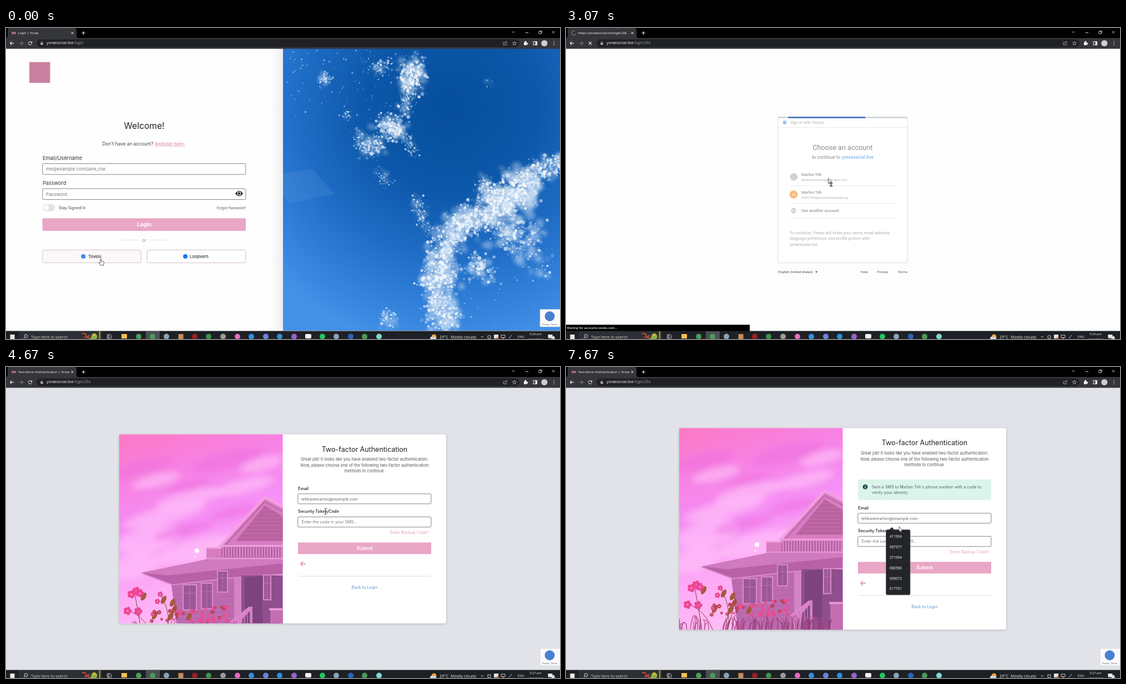
Write an HTML page with a canvas that moves like this. It is 998 px wide and 561 px high and loops after 8 s.

```html
<!DOCTYPE html>
<html lang="en">
<head>
<meta charset="utf-8">
<title>Sign-in walkthrough</title>
<style>
html, body { margin: 0; width: 100%; height: 100%; overflow: hidden; background: #fff }
canvas, svg, #url { position: absolute }
canvas { left: 499px; top: 37px }
svg { left: 0; top: 0 }
#url { left: 73px; top: 20px; width: 816px; font: 6.85px/14px "Open Sans", sans-serif; color: #9aa0a6;
  white-space: nowrap; overflow: hidden; text-overflow: ellipsis }
#url b { font-weight: 400; color: #fff }
</style>
</head>
<body>
<canvas id="sky" width="499" height="509"></canvas>
<svg width="998" height="561"></svg>
<div id="url"><b id="host"></b><span id="path"></span></div>
<script>
const $ = id => document.getElementById(id);
let seed = 11;
const rnd = () => (seed = seed * 16807 % 2147483647) / 2147483647;
const list = (n, f) => Array.from({ length: n }, (_, i) => f(i)).join('');

// ---- markup helpers; y of a text is its visual middle
const FONTS = { i: 'Inter', o: 'Open Sans', r: 'Roboto' };
const text = (x, y, s, size, fill, font = 'i', more = '') =>
  `<text x="${x}" y="${y + size * .36}" font-size="${size}" fill="${fill}" font-family="${FONTS[font]}, sans-serif" ${more}>${s}</text>`;
const MID = 'text-anchor="middle"', END = 'text-anchor="end"', SEMI = 'font-weight="500"', BOLD = 'font-weight="600"';
const rect = (x, y, w, h, fill, more = '') => `<rect x="${x}" y="${y}" width="${w}" height="${h}" fill="${fill}" ${more}/>`;
const dot = (x, y, r, fill, more = '') => `<circle cx="${x}" cy="${y}" r="${r}" fill="${fill}" ${more}/>`;
const line = (d, stroke, w = 1, more = '') => `<path d="${d}" fill="none" stroke="${stroke}" stroke-width="${w}" ${more}/>`;
const shape = (d, fill, more = '') => `<path d="${d}" fill="${fill}" ${more}/>`;
const group = (id, s, more = '') => `<g id="${id}" ${more}>${s}</g>`;
const input = (x, y, w, h) => rect(x, y, w, h, '#fff', 'rx="2" stroke="#66666a" stroke-width=".8"');

// ---- photo of clouds
function paintSky() {
  const c = $('sky').getContext('2d');
  c.translate(-499, -37);
  const g = c.createRadialGradient(800, 140, 30, 800, 140, 440);
  [[0, '#07509f'], [.3, '#0c57a9'], [.6, '#1f6dc6'], [.85, '#3483dc'], [1, '#4491e8']].forEach(s => g.addColorStop(...s));
  c.fillStyle = g;
  c.fillRect(499, 37, 499, 509);
  c.fillStyle = '#6a9fe030';
  c.beginPath();
  [[499, 262], [552, 254], [592, 300], [510, 316], [499, 300]].forEach(p => c.lineTo(...p));
  c.fill();
  const puffs = [
    [738, 65, 728, 105, 20, 170], [728, 105, 716, 150, 13, 80], [680, 175, 708, 185, 20, 130],
    [645, 220, 668, 205, 15, 90], [632, 185, 640, 215, 9, 30], [715, 190, 738, 228, 9, 40],
    [573, 92, 575, 92, 10, 45], [612, 152, 616, 164, 7, 22], [655, 70, 690, 68, 13, 35],
    [670, 260, 690, 285, 11, 22], [868, 97, 869, 98, 6, 10], [738, 302, 750, 350, 10, 65],
    [750, 350, 780, 385, 10, 40], [1000, 240, 930, 275, 17, 200], [940, 280, 880, 325, 31, 380],
    [885, 325, 805, 360, 24, 300], [815, 355, 775, 430, 24, 230], [755, 455, 805, 440, 21, 180],
    [775, 470, 790, 540, 26, 230], [860, 280, 866, 296, 14, 70], [890, 370, 950, 375, 25, 120],
    [840, 420, 870, 445, 20, 60], [915, 400, 985, 430, 25, 35], [686, 518, 690, 532, 13, 60]];
  const scatter = (count, size, color) => {
    for (const [x0, y0, x1, y1, spread, n] of puffs)
      for (let i = 0; i < n * count; i++) {
        const u = rnd(), off = () => (rnd() + rnd() + rnd() - 1.5) * spread * 1.15;
        c.fillStyle = color();
        c.beginPath();
        c.arc(x0 + (x1 - x0) * u + off(), y0 + (y1 - y0) * u + off(), size(spread), 0, 7);
        c.fill();
      }
  };
  c.filter = 'blur(3px)'; // soft body, then fine grain
  scatter(.35, s => s * (.12 + .22 * rnd()), () => '#d5e6f766');
  c.filter = 'blur(.6px)';
  scatter(2.4, s => .5 + rnd() ** 3 * Math.min(3, s * .16), () => rnd() < .3 ? '#8fb9e770' : `rgba(250,252,255,${.25 + .55 * rnd()})`);
  for (let i = 0; i < 150; i++) { // loose droplets
    c.fillStyle = `rgba(200,225,250,${.25 + .45 * rnd()})`;
    c.beginPath();
    const low = i > 90;
    c.arc((low ? 780 : 505) + rnd() * 200, (low ? 350 : 40) + rnd() ** 1.5 * (low ? 190 : 120), .5 + rnd() * 1.2, 0, 7);
    c.fill();
  }
}

// ---- browser frame and taskbar
const CROSS = 'M-2-2L2 2M2-2L-2 2';
const at = (x, y, s, id = '') => `<g ${id && `id="${id}"`} transform="translate(${x} ${y})">${s}</g>`;
const chrome = () =>
  rect(0, 0, 998, 19, '#000') + shape('M0 18Q3 18 3 14V3Q3 0 6 0H123Q127 0 127 4V14Q127 18 130 18Z', '#35363a') +
  rect(0, 18, 998, 19.5, '#35363a') + rect(55, 20.5, 870, 14, '#202124', 'rx="7"') +
  group('iconPink', rect(10, 7, 8, 4, '#9c6b80')) + group('iconBlue', dot(14, 9, 3.6, '#4285f4')) +
  at(14, 9, group('spin', line('M3.8 0A3.8 3.8 0 1 1 0-3.8', '#8a8d92', 1.1)) + dot(0, 0, 2.4, '#c8cacd', 'id="globe"')) +
  text(22, 9, '', 5.85, '#fff', 'o', 'id="tab"') + at(119.5, 9, line(CROSS, '#fff', .9)) +
  line('M139.5 6V12M136.5 9H142.5', '#fff') + line('M911.5 6L914 8.5L916.5 6M935.5 8.5H941', '#ddd', .9) +
  line('M960 6.5H964V10.5H960ZM961.5 6V5H965.5V9H964.5', '#ddd', .8) + at(986, 7.5, line(CROSS, '#ddd', .9)) +
  line('M14.5 27.5H7.5M10.5 24.5L7.5 27.5L10.5 30.5', '#eee', 1.1) + line('M23.5 27.5H30.5M27.5 24.5L30.5 27.5L27.5 30.5', '#777a7e', 1.1) +
  at(43.5, 27.5, group('reload', line('M2.8-1A3 3 0 1 0 2.8 1M3.2-3.4V-.8H.6', '#eee', 1)) + group('stop', line('M-2.6-2.6L2.6 2.6M2.6-2.6L-2.6 2.6', '#eee', 1.1))) +
  rect(62.3, 26.5, 4.4, 3.8, '#aeb1b5') + line('M63.2 26.5V25.3Q64.5 23 65.8 25.3V26.5', '#aeb1b5', .8) +
  line('M898 26H896V30.5H902V28.5M898 28.5Q898.5 25.5 902 25.5M900.5 23.5L902.5 25.5L900.5 27.5', '#bbb', .8) +
  line('M916 24L917 26.4L919.6 26.6L917.6 28.3L918.3 30.8L916 29.4L913.7 30.8L914.4 28.3L912.4 26.6L915 26.4Z', '#bbb', .8) +
  rect(933, 25.5, 5.5, 5.5, '#eee') + dot(936, 25, 1.4, '#eee') + dot(939, 28.3, 1.4, '#eee') +
  rect(950, 24.5, 6.5, 6, 'none', 'stroke="#eee"') + rect(953.5, 24.5, 3, 6, '#eee') + dot(969.8, 27.5, 5.6, '#cfcfd1') +
  [24.5, 27.5, 30.5].map(y => dot(987, y, .8, '#ddd')).join('');

function taskbar() {
  const marks = [[239, '#4a9a5a'], [264, '#4a9a5a'], [289, '#8aa3ba'], [340, '#9c1f26'], [365, '#3f8f4d'], [391, '#9a9a9a'],
    [417, '#e86ac0'], [442, '#2f8fe0'], [468, '#6a84e0'], [493, '#2a8fd8'], [519, '#9a62c8'], [570, '#1fc75c'],
    [595, '#8aa3ba'], [621, '#2b62b8'], [646, '#4a9a5a'], [672, '#7fd8cf']];
  return rect(0, 546.5, 998, 15, '#1d2024') + rect(23, 547, 150, 14, '#2c2f33') + rect(252, 547, 25, 14, '#4b4e52') +
    rect(7.5, 553, 8, 8, '#e8e8e8') + line('M32 560L34 557.8', '#ddd', 1) + dot(36, 555.6, 2.8, 'none', 'stroke="#ddd"') +
    text(45, 557.3, 'Type here to search', 7.25, '#d0d0d0', 'o') +
    line('M137 552Q143 549 145 556L152 561M141 557Q146 561 150 554', '#c4503f', 2) + shape('M152 561Q154 548 161 551Q167 555 163 561Z', '#8cae3c') + dot(159, 554, 2, '#e8c34a') +
    rect(167.5, 547, 2.5, 14, '#b08a2c') + line('M182 553H189M182 560H189M182 555H186V558H182ZM190 554V560', '#ddd', .9) +
    rect(208, 552, 10, 8, '#f0c14b') + rect(310.5, 552, 9, 9, '#c9895a') + rect(539, 552, 11, 8, '#f4f4f4', 'rx="2"') +
    marks.map(([x, c]) => dot(x, 556.5, 5, c)).join('') +
    dot(771, 557, 4.5, '#e8a53c') + rect(764, 557, 11, 5, '#cfd8e4', 'rx="2.5"') +
    text(781, 557.3, '29°C', 7.25, '#eee', 'o') + text(801, 557.3, 'Mostly cloudy', 7.2, '#eee', 'o') +
    line('M855.5 558.5L858 556L860.5 558.5M868 555H873V560H868ZM892 554H899V558.5H892ZM895.5 558.5V561M906 560L911 554', '#ddd', .9) +
    rect(879, 553, 8, 7, '#e8e8e8') + dot(886, 559, 2, '#e07030') +
    text(922, 557, 'ENG', 5.9, '#eee', 'o') + text(954, 551.8, '', 5.7, '#eee', 'o', MID + ' id="clock"') +
    text(954, 561.5, '17/2/2023', 5.7, '#eee', 'o', MID) + rect(976.5, 553, 8, 6.5, '#eee') + dot(985.5, 559, 3.2, '#d8dade');
}

// ---- pages
const badge = rect(962, 507.5, 37, 31.5, '#fafafa', 'rx="1" stroke="#ccc" stroke-width=".6"') +
  dot(979.5, 520, 9, '#4a7fd0') + text(979.5, 534.5, 'Privacy - Terms', 4, '#555', 'r', MID);

const login = () =>
  rect(0, 37, 499, 510, '#fefefe') + rect(474, 37, 25, 510, 'url(#edge)') + rect(42, 61.5, 37.5, 37.5, '#c9819f') +
  text(249, 176, 'Welcome!', 15.6, '#222', 'i', MID) +
  text(265.5, 208.8, "Don't have an account?", 8.3, '#444', 'i', END) +
  text(268, 208.8, 'Register here.', 8.15, '#e59cbf', 'i', BOLD + ' text-decoration="underline"') +
  text(66, 234.8, 'Email/Username', 9.2, '#333') + input(65.8, 244.6, 366, 19.6) + text(72, 254.5, 'me@example.com/jane_roe', 8.2, '#7a7a7e') +
  text(66, 280, 'Password', 9.2, '#333') + input(65.8, 289.8, 366, 19.6) + text(72, 299.7, 'Password', 8.2, '#7a7a7e') +
  shape('M413 298.5Q420 289 427 298.5Q420 308 413 298.5Z', '#222') + dot(420, 298.5, 3.4, '#fff') + dot(420, 298.5, 2.3, '#222') +
  rect(66, 318, 22.5, 12.5, '#e2e2e8', 'rx="6.2"') + dot(72.2, 324.2, 4.8, '#fff') +
  text(95, 324.2, 'Stay Signed In', 7.2, '#444') + text(432, 325, 'Forgot Password?', 6.2, '#555', 'i', END) +
  rect(65.6, 343.3, 366.4, 22.7, '#e9a6c5', 'rx="2"') + text(249, 354.6, 'Login', 9.7, '#fff', 'i', MID + ' font-weight="700"') +
  line('M208 382.5H241M257 382.5H290', '#ddd', .8) + text(249, 383, 'or', 8.2, '#999', 'i', MID) +
  rect(65.8, 400.3, 177.5, 23.3, '#faf8f8', 'id="signBtn" rx="3" stroke="#d0b4c0" stroke-width=".8"') + dot(139.3, 412, 4, '#4285f4') + text(148, 411.8, 'Tovelu', 7.5, '#333', 'i', SEMI) +
  rect(254.2, 400.3, 177.5, 23.3, '#fff', 'rx="3" stroke="#c9b0bc" stroke-width=".8"') + dot(323, 412, 4, '#1877f2') + text(331, 411.8, 'Loopvern', 7.5, '#333', 'i', SEMI) + badge;

const row = (y, mail) => text(424, y, 'Marlon Teh', 7.3, '#3c4043', 'r', SEMI) + text(424, y + 9.5, mail, 6.15, '#5f6368', 'r');
const chooser = () =>
  rect(0, 37, 998, 510, '#fdfdfd') + group('choose',
    rect(381.8, 160.8, 233.4, 262.8, '#fff', 'rx="3.5" stroke="#d6d8dc" stroke-width=".9"') +
    group('fade', rect(382.3, 253, 232.4, 31.5, '#dfebf8', 'id="hover"') +
      dot(394, 170.3, 3.4, '#4285f4') + text(404, 170.3, 'Sign in with Tovelu', 7.3, '#5f6368', 'r') + line('M382 179.7H615', '#c8cace', .9) +
      text(498.3, 215, 'Choose an account', 12.6, '#202124', 'r', MID) +
      text(494, 233.5, 'to continue to', 8.3, '#202124', 'r', END) + text(497, 233.5, 'yoraesocial.live', 8.2, '#1a73e8', 'r', SEMI) +
      dot(410.5, 268.5, 6.8, '#a9a9ad') + row(264, 'tehkweimarlon@example.com') +
      dot(410, 300.3, 7.3, '#ef7d00') + text(410, 300.3, 'M', 7, '#fff', 'r', MID) + row(296, '305172H@mymail.example.sg') +
      line('M403 284.5H594M403 316.5H594M403 342.5H594', '#c8cace', .8) +
      dot(410, 329.3, 4, 'none', 'stroke="#5f6368"') + dot(410, 328, 1.4, '#5f6368') + line('M407.4 331.8Q410 329.5 412.6 331.8', '#5f6368') +
      text(424, 329.2, 'Use another account', 7.35, '#3c4043', 'r', SEMI) +
      ['To continue, Tovelu will share your name, email address,', 'language preference, and profile picture with', 'yoraesocial.live.']
        .map((s, i) => text(403, 369 + i * 10.5, s, 7.3, '#5f6368', 'r')).join('')) +
    group('progress', rect(382, 160, 233, 2.6, '#cdd3d6') + rect(382, 160, 0, 2.6, '#3f74c0', 'id="bar"')) +
    text(382, 440, 'English (United States)', 6.2, '#444', 'r') + shape('M449 439H453.4L451.2 441.4Z', '#444') +
    text(531, 440, 'Help', 6.2, '#555', 'r') + text(560.5, 440, 'Privacy', 6.2, '#555', 'r') + text(615, 440, 'Terms', 6.2, '#555', 'r', END));

const flower = (x, y, r, c) => list(5, i => dot(x + r * Math.cos(i * 1.26), y + r * Math.sin(i * 1.26), r * .7, c));
function house() {
  const cloud = (x, y, w, h, c) => `<ellipse cx="${x}" cy="${y}" rx="${w}" ry="${h}" fill="${c}" transform="rotate(-14 ${x} ${y})"/>`;
  const clouds = [[330, 238, 62, 15], [285, 268, 75, 15], [255, 312, 60, 24], [345, 330, 75, 20], [430, 215, 55, 13], [270, 205, 45, 11], [460, 175, 40, 12], [230, 360, 50, 22]];
  const dusk = [[250, 180, 55, 13], [400, 168, 65, 16], [320, 295, 55, 11], [410, 262, 45, 11], [330, 215, 40, 9]];
  const window = (x, y, w, h) => rect(x, y, w, h, '#9c5798', 'stroke="#d98acb" stroke-width="2"') + line(`M${x + w / 2} ${y}v${h}M${x} ${y + h / 3}h${w}`, '#c67bba', .8);
  return rect(204, 121, 295, 366, 'url(#dawn)') +
    `<g filter="url(#soft)">${clouds.map(a => cloud(...a, '#ffc3f9a0')).join('') + dusk.map(a => cloud(...a, '#ee6de088')).join('')}</g>` +
    dot(344, 331.5, 4.2, '#fff') + dot(341, 343, 1.4, '#fff') +
    shape('M388 324L466 235L499 255V324Z', '#d87cc2') + shape('M414 314L466 250L499 270V314Z', '#b9629f') +
    list(9, i => line(`M${460 - i * 6} ${258 + i * 7}H499`, '#cf78b8', .8)) + line('M384 325L466 235L499 253', '#f3a0e0', 4.5) + line('M390 327L466 243L499 261', '#a95597', 1.2) +
    rect(361, 326, 28, 20, '#d87cc0') + rect(388, 322, 111, 24, '#b562a2') + list(22, i => rect(390 + i * 5, 324, 2.2, 21, '#dd8aca')) +
    rect(386, 321, 113, 3.5, '#ee9edb') + rect(361, 325, 28, 3, '#ee9edb') + rect(361, 344, 138, 4, '#e592d2') +
    shape('M244 371L300 361L361 347H499V374L412 380L300 394Z', '#b861a8') + shape('M244 371L361 347H499V354L290 376Z', '#d07abf') + line('M244 372L300 393L412 380L499 374', '#e08ecf', 2) +
    shape('M298 394L411 381V487H310Z', '#bd6bb0') + list(8, i => line(`M${300} ${402 + i * 9}L411 ${395 + i * 9}`, '#a95b9e', .5)) +
    window(319, 393, 24, 45) + window(352, 390, 20, 46) + window(381, 368, 18, 38) +
    rect(424, 376, 75, 111, '#8f4e8d') + window(464, 375, 13, 45) + shape('M430 380L462 376V462H430Z', '#7c437f') + rect(411, 380, 13, 107, '#d383c3') +
    shape('M404 459L438 432L442 437L412 470Z', '#dd87cb') + list(7, i => line(`M${410 + i * 5} ${459 - i * 4}v26`, '#d07bbf', 1.5)) + rect(440, 432, 4, 55, '#d383c3') +
    rect(476, 437, 23, 50, '#c46db2') + rect(474, 435, 25, 4, '#e698d6') +
    list(95, () => { const x = 204 + rnd() * 270; return line(`M${x} 488Q${x + 2} 470 ${x + rnd() * 16 - 8} ${458 + rnd() * 18}`, rnd() < .5 ? '#8c3a72' : '#b34a86', 1.2); }) +
    line('M245 487Q238 440 232 410M265 487Q250 450 222 440M290 487Q300 450 280 412M290 487Q305 440 304 425', '#7b4a3d', 1) +
    [[248, 414], [300, 425], [303, 437], [284, 420], [330, 450], [268, 448], [296, 450]].map(([x, y]) => `<ellipse cx="${x}" cy="${y}" rx="4" ry="8" fill="#a5593f" transform="rotate(28 ${x} ${y})"/>`).join('') +
    [[226, 410], [241, 408], [219, 440], [238, 441], [235, 404]].map(([x, y]) => flower(x, y, 4.5, '#ee4694')).join('') +
    list(48, () => flower(252 + rnd() * 155, 432 + rnd() * 28, 1.3 + rnd() * 1.4, rnd() < .7 ? '#ee4a8e' : '#b8404f')) + flower(278, 410, 3, '#e8458a') + flower(273, 423, 3, '#e8458a');
}

const back = y => line(`M526 ${y}H766`, '#dcdce0', .9) + text(646, y + 19.6, 'Back to Login', 7.3, '#5b98d2', 'i', MID);
const twoFactor = () =>
  rect(0, 37, 998, 510, '#e2e3e9') + group('card',
    rect(204, 121.5, 589, 341, '#fff', 'class="tall" rx="4" style="filter:drop-shadow(0 1px 2px #0003)"') +
    `<g clip-path="url(#pic)">${house()}</g>` +
    text(646, 148.3, 'Two-factor Authentication', 12.5, '#222', 'i', MID) +
    ['Great job! It looks like you have enabled two-factor authentication.', 'Now, please choose one of the following two-factor authentication', 'methods to continue.']
      .map((s, i) => text(646, 166.8 + i * 10.5, s, 7.35, '#555', 'i', MID)).join('') +
    group('options', rect(526, 214, 240, 27, '#dd9aba') + rect(526, 254, 240, 27, '#e9a6c5') +
      line('M544.5 235L542 233.5A6 6 0 1 1 547 233.5ZM542.5 226H547M542.5 229H545.5', '#fff', 1.2) + text(557, 227.7, 'Get a code via SMS', 8.3, '#fff') +
      line('M546 262.5A6 6 0 1 0 549.5 267M543 266L545 268.5L542.5 270.5', '#fff', 1.2) + rect(546.5, 263, 5.5, 4.5, '#fff') + line('M547.7 263V261.3Q549.3 259 550.8 261.3V263', '#fff') + text(557, 267.7, 'Use Authenticator App', 8.3, '#fff') + back(294)) +
    group('alert', rect(526, 214, 240, 37.5, '#dcf4ea', 'rx="3"') + dot(539, 227.5, 4.4, '#1d4a4c') + rect(538.4, 227, 1.3, 3, '#fff') + dot(539, 225.3, .8, '#fff') +
      text(551, 227.5, "Sent a SMS to Marlon Teh's phone number with a code to", 7.25, '#4f6664') + text(551, 238, 'verify your identity.', 7.25, '#4f6664')) +
    group('form', text(526, 219, 'Email', 7.25, '#333', 'i', BOLD) + input(525.8, 228.8, 240, 18) + text(532, 238, 'tehkweimarlon@example.com', 7.2, '#666') +
      text(526, 260.6, 'Security Token/Code', 7.25, '#333', 'i', BOLD) + input(525.8, 270.4, 240, 18.4) + text(532.5, 279.7, 'Enter the code in your SMS...', 7.3, '#7a7a7e') +
      rect(532.3, 275, .9, 9.5, '#222', 'id="caret"') + text(762, 298.5, 'Enter Backup Code?', 7.3, '#e59cbf', 'i', END + ' id="backup"') +
      rect(526, 316.5, 240, 21, '#e9a6c5') + text(646, 327, 'Submit', 8.7, '#fff', 'i', MID + ' ' + BOLD) +
      line('M540 355H531M535 350.5L530.8 355L535 359.5', '#e59cbf', 1.8) + back(377.4))) + badge;

const dropdown = shape('M582 294L587 289L592 294Z', '#232529') + rect(576.5, 293.5, 43.5, 117.5, '#232529', 'rx="2.5" stroke="#55585c" stroke-width=".6"') +
  [411904, 687977, 371994, 680586, 999073, 617761].map((n, i) => text(583, 305.7 + i * 18.9, n, 6.35, '#fff', 'o')).join('');

const EDGED = 'stroke="#111" stroke-width=".7"';
const arrow = shape('M0 0V9.6L2.2 7.6L3.7 11L5.1 10.4L3.7 7.1H6.6Z', '#fff', EDGED);
const pointers = group('arrow', arrow) +
  group('hand', shape('M-1 .8Q0-.8 1 .8V4.2L4.6 5Q5.6 5.5 5.4 8L4.6 11.5H-.6L-3.4 7.4Q-3.2 5.8-1 7Z', '#fff', EDGED)) +
  group('beam', line('M-2-5H-.5L0-4.4L.5-5H2M0-4.4V4.4M-2 5H-.5L0 4.4L.5 5H2', '#111', .9)) +
  group('busy', arrow + shape('M2.5 8.5H7.5L5 11.5Z', '#e0c23a', EDGED) + shape('M2.5 14.5H7.5L5 11.5Z', '#59a9d8', EDGED));

const grad = (id, dir, ...stops) => `<linearGradient id="${id}" x2="${dir[0]}" y2="${dir[1]}">${stops.map((c, i) => `<stop offset="${i / (stops.length - 1)}" stop-color="${c}"/>`).join('')}</linearGradient>`;
document.querySelector('svg').innerHTML =
  `<defs>${grad('edge', [1, 0], '#fefefe', '#f8f8f8', '#ececee')}${grad('dawn', [.25, 1], '#fc79c4', '#f782e4', '#f690f6', '#fdaaf6', '#ffbdf6')}
  <filter id="soft"><feGaussianBlur stdDeviation="6"/></filter><clipPath id="pic">${rect(204, 121.5, 294.5, 341, '#000', 'class="tall"')}</clipPath></defs>` +
  group('login', login()) + group('chooser', chooser()) + group('twoFactor', twoFactor()) + group('dropdown', dropdown) + chrome() +
  group('status', rect(0, 535.3, 331, 11.7, '#000', 'id="statusBox" rx="1"') + text(1.5, 541.2, '', 5.55, '#eee', 'o', BOLD + ' id="statusText"')) +
  taskbar() + group('pointer', pointers);
paintSky();

// ---- timeline
const auth = 'response_type=code&client_id=638007043747-8jleaijoqunl8n92ujtpolgpg32nam4u.apps.toveluusercontent.com&redirect_uri=https%3A%2F%2Fyoraesocial.live%2Fapi%2Fauth%2Ftovelu%2Fcallback&scope=https%3A%2F%2Fwww.toveluapis.com%2Fauth%2Fuserinfo.profile';
const HOST = 'yoraesocial.live', ACCOUNTS = 'accounts.tovelu.com';
const urls = [[0, HOST, '/login'], [530, ACCOUNTS, '/o/oauth2/v2/auth?' + auth], [800, ACCOUNTS, '/o/oauth2/v2/auth/oauthchooseaccount?' + auth], [2530, HOST, '/login/2fa']];
const titles = [[0, 'Login | Yorae'], [530, 'Sign in - Tovelu Accounts'], [2530, 'https://yoraesocial.live/login/2fa'], [3460, 'Two-factor Authentication | Yorae']];
const notes = [[0, ''], [200, 'https://yoraesocial.live/api/auth/tovelu', 112, 930], [2060, `Waiting for ${ACCOUNTS}...`, 331, 4600], [6200, `Waiting for ${HOST}...`, 331, 6800]];
const shown = [[0, 'hand'], [600, 'arrow'], [1300, 'hand'], [1460, 'arrow'], [2600, 'busy'], [3460, 'hand'], [4660, 'beam'], [6260, 'arrow']];
const moves = [[930, 1400, 472.5, 271], [3150, 3530, 568.5, 222.5], [4400, 4860, 580, 284], [7520, 7670, 600, 288]];
const now = (steps, t) => steps.filter(s => s[0] <= t).pop();
const within = (t, ...spans) => spans.some(([a, b]) => t >= a && t < b);
const show = (id, on) => $(id).style.display = on ? '' : 'none';

function render(t) {
  show('sky', t < 860);
  show('login', t < 860);
  $('signBtn').setAttribute('fill', t < 330 ? '#faf8f8' : '#e2e1e5');
  $('signBtn').setAttribute('stroke', t < 330 ? '#d0b4c0' : '#bd8f9f');

  show('chooser', within(t, [860, 3400]));
  show('choose', t >= 930);
  show('hover', within(t, [1330, 1900]));
  $('fade').setAttribute('opacity', t < 1460 ? 1 : .52);
  show('progress', t >= 1930);
  const tail = 243 + 372 * ((t + 180) % 1340 / 1340);
  const left = Math.max(382, tail), right = Math.min(615, tail + 139);
  $('bar').setAttribute('x', left);
  $('bar').setAttribute('width', Math.max(0, right - left));

  const sent = t >= 6260;
  show('twoFactor', t >= 3400);
  show('options', t < 4130);
  show('form', t >= 4130);
  show('backup', t >= 4400);
  show('alert', sent);
  show('caret', within(t, [4860, 5395], [5995, 6465], [7065, 7525]));
  show('dropdown', t >= 5995);
  $('card').setAttribute('transform', `translate(0 ${sent ? -11.3 : 0})`);
  $('form').setAttribute('transform', `translate(0 ${sent ? 46.3 : 0})`);
  document.querySelectorAll('.tall').forEach(e => e.setAttribute('height', sent ? 363.5 : 341));

  const busy = within(t, [530, 1200], [1930, 4530], [6130, 6330]);
  show('stop', busy);
  show('reload', !busy);
  show('spin', busy);
  show('globe', within(t, [530, 1200]));
  show('iconPink', !busy && (t < 530 || t > 4000));
  show('iconBlue', within(t, [1200, 1930]));
  $('spin').setAttribute('transform', `rotate(${t * .36})`);
  $('spin').firstChild.setAttribute('stroke', t > 3400 ? '#8ab4f8' : '#8a8d92');
  $('tab').textContent = now(titles, t)[1];
  [, $('host').textContent, $('path').textContent] = now(urls, t);
  $('clock').textContent = t < 3400 ? '5:26 pm' : '5:27 pm';

  const [, note, width = 0, end = 0] = now(notes, t);
  $('statusText').textContent = note;
  $('statusBox').setAttribute('width', width);
  $('status').setAttribute('opacity', Math.max(0, Math.min(1, (end - t) / 130)));

  let x = 171, y = 416.5;
  for (const [a, b, toX, toY] of moves) {
    const u = Math.max(0, Math.min(1, (t - a) / (b - a))), e = u * u * (3 - 2 * u);
    x += (toX - x) * e;
    y += (toY - y) * e;
  }
  $('pointer').setAttribute('transform', `translate(${x} ${y})`);
  const kind = now(shown, t)[1];
  ['arrow', 'hand', 'beam', 'busy'].forEach(id => show(id, id === kind));
}

const STEP = 1000 / 15, start = performance.now();
(function tick() {
  const t = (performance.now() - start) % 8000;
  render(Math.floor((t + 4) / STEP) * STEP);
  requestAnimationFrame(tick);
})();
</script>
</body>
</html>
```
